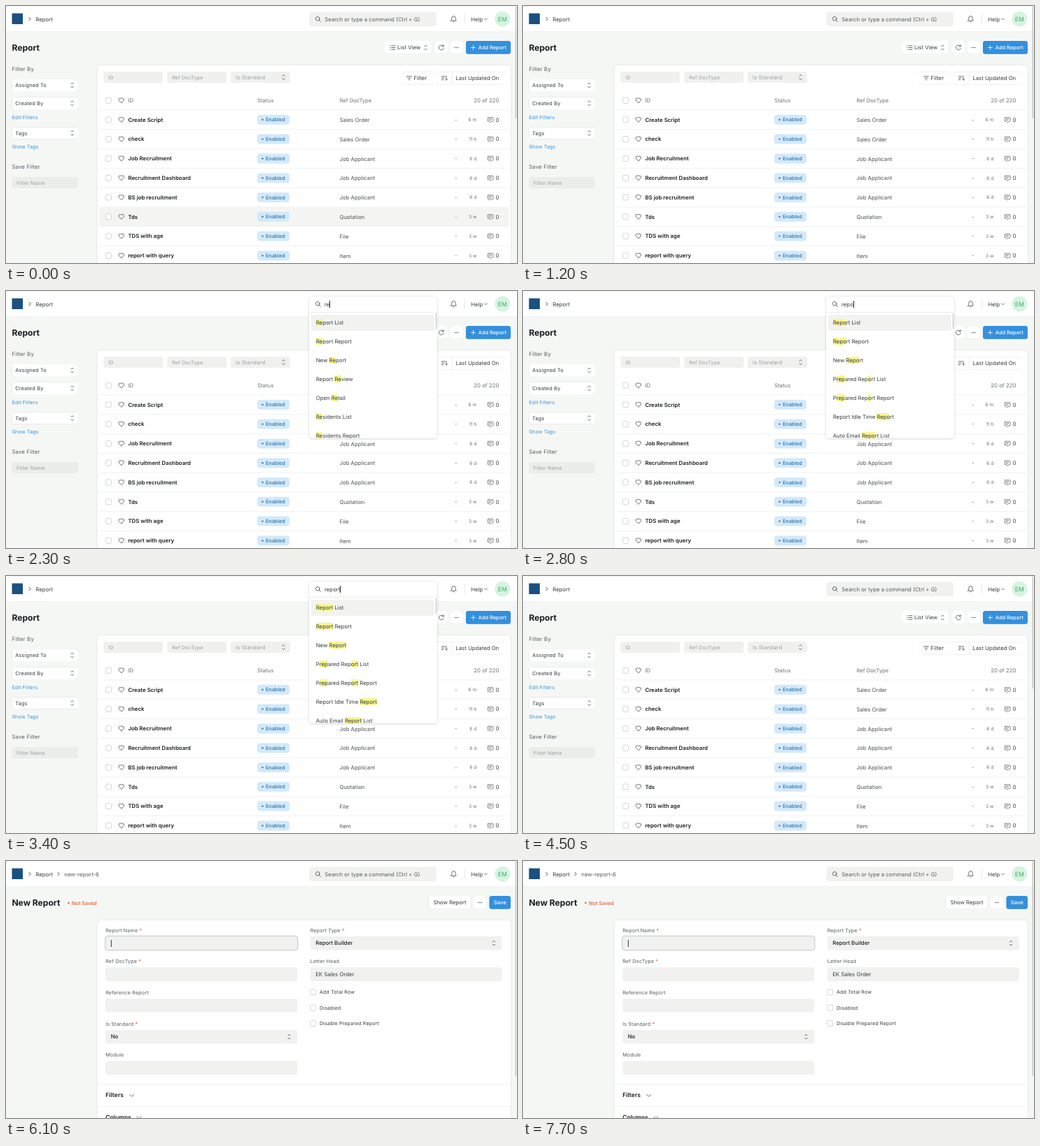
Animation of 730x368 px, one loop 8 s. Source, as an HTML page:

```html
<!DOCTYPE html>
<html lang="en">
<head>
<meta charset="utf-8">
<title>Report list</title>
<style>
html, body { margin: 0; width: 100%; height: 100%; overflow: hidden; background: #f5f7f5; }
body { position: relative; font: 7.8px Inter, sans-serif; color: #383c40; text-rendering: geometricPrecision; }
svg { position: absolute; left: 0; top: 0; display: block; }
text { font-family: Inter, sans-serif; white-space: pre; }
.card { filter: drop-shadow(0 .5px 1px rgba(0, 0, 0, .13)); }
.btn { filter: drop-shadow(0 .4px .6px rgba(0, 0, 0, .28)); }
.line { fill: none; stroke: #444a4f; stroke-width: .8; stroke-linecap: round; stroke-linejoin: round; }
#panel { position: absolute; left: 433px; top: 8px; width: 182.5px; height: 203px; overflow: hidden;
  background: #fff; border-radius: 4px; box-shadow: 0 .5px 3px rgba(0, 0, 0, .22); }
#typed { position: absolute; left: 22px; top: 5.5px; line-height: 10px; height: 10px; border-right: .8px solid #222; }
#hint { position: absolute; left: 22.5px; top: 5.5px; line-height: 10px; color: #777; }
#panel svg { left: 8px; top: 6px; }
#items { position: absolute; left: 0; top: 21.5px; width: 100%; height: 180px; border-top: .6px solid #eaeceb; }
#items div { position: absolute; left: 3px; width: 176px; height: 23px; line-height: 23px; padding-left: 6.7px;
  box-sizing: border-box; border-radius: 3px; white-space: pre; }
#items div:first-child { background: #f2f3f1; }
#items i { position: absolute; right: .5px; top: 1px; width: 1px; height: 22px; background: #b9bcba; }
mark { background: #f8f68f; color: inherit; }
</style>
</head>
<body>
<svg id="stage" width="730" height="368" viewBox="0 0 730 368"></svg>
<div id="panel">
  <svg width="10" height="10"><g class="line"><circle cx="4.2" cy="4.2" r="2.8"/><path d="M6.3 6.3L8.4 8.4"/></g></svg>
  <span id="hint">Search or type a command (Ctrl + G)</span>
  <span id="typed"></span>
  <div id="items"></div>
</div>
<script>
const $ = id => document.getElementById(id);
const INK = '#383c40', DARK = '#1a1e22', GREY = '#6b7177', PALE = '#9a9fa3', BLUE = '#3490dd', FIELD = '#f1f2f0';

// y is the vertical middle of the text
const text = (x, y, s, { size = 7.8, fill = INK, weight = 400, anchor = 'start', gap = 0 } = {}) =>
  `<text x="${x}" y="${y + size * .36}" font-size="${size}" fill="${fill}" font-weight="${weight}" text-anchor="${anchor}" letter-spacing="${gap}">${s}</text>`;
const small = (x, y, s, o) => text(x, y, s, { size: 7.2, gap: .144, ...o });
const rect = (x, y, w, h, r, fill, more = '') =>
  `<rect x="${x}" y="${y}" width="${w}" height="${h}" rx="${r}" fill="${fill}" ${more}/>`;
const line = (d, more = '') => `<path class="line" d="${d}" ${more}/>`;
const rule = (x1, x2, y) => line(`M${x1} ${y}H${x2}`, 'style="stroke:#e9ecea;stroke-width:.7"');
const button = (x, y, w, h, fill = '#fff', id = '') => rect(x, y, w, h, 3.5, fill, `class="btn" ${id}`);
const updown = (x, y) => line(`M${x - 1.7} ${y - 1.7}l1.7-1.8 1.7 1.8M${x - 1.7} ${y + 1.7}l1.7 1.8 1.7-1.8`);
const down = (x, y, r = 1.8) => line(`M${x - r} ${y - r / 2}l${r} ${r} ${r}-${r}`);
const right = (x, y) => line(`M${x - 1} ${y - 2.2}l2.2 2.2-2.2 2.2`, 'style="stroke-width:1"');
const check = (x, y) => rect(x - 4, y - 4, 8, 8, 2, '#fff', 'stroke="#bfc4c6" stroke-width=".7"');
const heart = (x, y) => line(`M${x} ${y + 3.4}l-3.3-3.3a2.1 2.1 0 0 1 3.3-2.7a2.1 2.1 0 0 1 3.3 2.7z`);
const dots = (x, y) => [-2.2, 0, 2.2].map(d => `<circle cx="${x + d}" cy="${y}" r=".65" fill="${INK}"/>`).join('');
const card = () => rect(130.5, 85, 590.5, 300, 5, '#fff', 'class="card"');

function header() {
  return rect(0, 0, 730, 36.6, 0, '#fff') + rule(0, 730, 36.8) + rule(0, 730, .3) +
    rect(8.5, 10.5, 15.5, 15.5, 0, '#1b507f') +
    right(34, 18.5) + text(42.3, 18.7, 'Report') +
    rect(433.5, 8.5, 181.5, 20.5, 4, FIELD) +
    `<g class="line"><circle cx="445.2" cy="18.2" r="2.8"/><path d="M447.3 20.3l2.1 2.1"/></g>` +
    text(455.3, 18.7, 'Search or type a command (Ctrl + G)', { fill: '#555b60' }) +
    line('M635.6 21h7.8c-1-1-1.3-2-1.3-4a2.6 2.6 0 0 0-5.2 0c0 2-.3 3-1.3 4zM638.6 22.6q.9.9 1.8 0') +
    line('M655.3 11.5v14', 'style="stroke:#dcdfdd;stroke-width:.7"') +
    text(664.3, 18.7, 'Help') + down(685.6, 18.8) +
    `<circle cx="709.3" cy="18.5" r="11" fill="#d5f4df"/>` +
    text(709.3, 18.7, 'EM', { size: 8.6, fill: '#46ab6c', anchor: 'middle' });
}

function sidebar() {
  const select = (y, s) => button(8.5, y - 8.6, 94.5, 17.2) + small(13.2, y, s, { size: 7.4 }) + updown(94.6, y);
  const link = (y, s) => small(8.4, y, s, { fill: '#2f93e0', size: 7.1 });
  const title = (y, s) => text(8.4, y, s, { gap: .156, fill: '#565c61' });
  return title(90.5, 'Filter By') + select(113.5, 'Assigned To') + select(139.3, 'Created By') +
    link(159, 'Edit Filters') + select(182, 'Tags') + link(201.5, 'Show Tags') + title(230.5, 'Save Filter') +
    rect(8.5, 244.8, 94.5, 16.2, 3.5, '#ebedeb') + small(15, 253, 'Filter Name', { fill: PALE });
}

const rows = [
  ['Create Script', 'Sales Order', '6 m'], ['check', 'Sales Order', '11 h'],
  ['Job Recruitment', 'Job Applicant', '6 d'], ['Recruitment Dashboard', 'Job Applicant', '6 d'],
  ['BS job recruitment', 'Job Applicant', '6 d'], ['Tds', 'Quotation', '3 w'],
  ['TDS with age', 'File', '3 w'], ['report with query', 'Item', '3 w']
];

function row([name, type, age], i) {
  const y = 162.8 + i * 27.8;
  return (i === 5 ? rect(133, y - 13.5, 585.5, 27, 0, '#f4f5f3', 'id="hover"') : '') +
    check(146.5, y) + heart(164.8, y) + text(174.4, y, name, { size: 7.85, weight: 600, fill: DARK }) +
    rect(359, y - 7, 46, 14, 4, '#d3e9f9') + `<circle cx="366.5" cy="${y}" r="1.2" fill="#2b78b8"/>` +
    text(371, y, 'Enabled', { size: 7.2, weight: 500, fill: '#2873b2' }) +
    text(476.5, y + .4, type, { fill: '#4b5156' }) + text(641, y, '-', { fill: GREY }) +
    text(672.3, y, age, { size: 6.6, fill: GREY, anchor: 'end' }) +
    line(`M689 ${y - 3.2}h6.2q.8 0 .8.8v4.2q0 .8-.8.8h-1.8l-1.4 1.5-1.4-1.5h-1.6q-.8 0-.8-.8v-4.2q0-.8.8-.8M690 ${y - 1.2}h4M690 ${y + .7}h2.6`, 'style="stroke-width:.65"') +
    text(704.5, y, '0', { anchor: 'end' }) + rule(133, 718.5, y + 13.9);
}

function listPage() {
  const filter = (x, s, size = 7.2) => rect(x, 94, 85, 16, 3, '#f0f1ef') + text(x + 7, 102, s, { size, fill: PALE, gap: .1 });
  return text(8.4, 59.2, 'Report', { size: 12.1, weight: 700, fill: DARK }) +
    button(541, 50, 67.5, 18.8) + line('M550.5 56.8h5.5M550.5 59.5h5.5M550.5 62.2h5.5M548.4 56.8h.1M548.4 59.5h.1M548.4 62.2h.1') +
    text(559, 59.5, 'List View') + updown(599.5, 59.5) +
    button(613, 50, 18, 18.8) + line('M624.8 57.6a3.4 3.4 0 1 0 .5 2.6M625.2 55.6v2.3h-2.3') +
    button(635, 50, 18, 18.8) + dots(643.7, 59.5) +
    rect(656, 49, 66, 20.8, 4.4, '#b5d9f4', 'id="ring"') + button(657, 50, 64, 18.8, BLUE, 'id="add"') +
    line('M664.5 59.5h6M667.5 56.5v6', 'style="stroke:#fff"') +
    text(674.8, 59.5, 'Add Report', { size: 7.4, fill: '#fff', weight: 500 }) +
    sidebar() + card() +
    filter(139.3, 'ID') + filter(230.2, 'Ref DocType') + filter(321, 'Is Standard', 7.7) + updown(396.5, 102) +
    button(566, 94.3, 44, 18) + line('M572.5 100.8h7M573.8 103.2h4.4M575.2 105.6h1.6') + text(582.3, 103.3, 'Filter', { size: 8 }) +
    button(615, 94.3, 97, 18) + line('M622.3 100.8h5.5M622.3 103.2h3.8M622.3 105.6h2.2M629.2 100.6v5.4M627.8 104.7l1.4 1.4 1.4-1.4') +
    line('M637.3 94.8v17', 'style="stroke:#e3e6e4;stroke-width:.7"') + text(642.3, 103.3, 'Last Updated On') +
    check(146.5, 135.3) + heart(164.8, 135.3) + text(174.4, 135.3, 'ID', { fill: GREY }) +
    text(359, 135.3, 'Status', { fill: GREY }) + text(476.5, 135.3, 'Ref DocType', { size: 7.6, fill: GREY }) +
    text(704.4, 135.3, '20 of 220', { anchor: 'end', fill: GREY }) + rule(133, 718.5, 148.9) +
    rows.map(row).join('');
}

function formPage() {
  const field = (x, y, label, value = '', { star, pick, bold } = {}) =>
    small(x, y, label + (star ? ' <tspan fill="#e2553f">*</tspan>' : ''), { fill: '#555b60' }) +
    rect(x, y + 8.7, 274, 19.8, 3.5, FIELD) +
    text(x + 7.5, y + 18.6, value, { weight: bold ? 500 : 400, fill: bold ? DARK : INK }) +
    (pick ? updown(x + 262.3, y + 18.6) : '');
  const tick = (y, s) => check(438.6, y) + small(448, y, s, { size: 7.1 });
  const section = (y, s, x) => rule(130.5, 721, y - 15.3) + text(142.2, y, s, { size: 8.6, weight: 600, fill: DARK }) + down(x, y + .6, 3);
  return right(75, 18.5) + text(83.3, 18.7, 'new-report-6', { fill: '#555b60' }) +
    text(8.4, 59.2, 'New Report', { size: 12.1, weight: 700, fill: DARK }) +
    `<circle cx="89.4" cy="60" r="1.2" fill="#e0592f"/>` + small(94, 60, 'Not Saved', { fill: '#e0592f', weight: 500, gap: .05 }) +
    button(603.5, 50, 61, 18.8) + text(634, 59.5, 'Show Report', { anchor: 'middle' }) +
    button(668, 50, 18, 18.8) + dots(677, 59.5) +
    button(690.5, 50, 30.5, 18.8, BLUE) + text(705.7, 59.5, 'Save', { fill: '#fff', anchor: 'middle', weight: 500, size: 7.7 }) +
    card() +
    field(142.2, 99, 'Report Name', '', { star: 1 }) +
    rect(141.7, 107.3, 275, 20.6, 4, FIELD, 'stroke="#cdd1d2" stroke-width="1.3"') +
    rect(149.9, 113, .9, 10, 0, '#222', 'id="caret"') +
    field(142.2, 143.6, 'Ref DocType', '', { star: 1 }) +
    field(142.2, 188.2, 'Reference Report') +
    field(142.2, 233, 'Is Standard', 'No', { star: 1, pick: 1, bold: 1 }) +
    field(142.2, 277.5, 'Module') +
    field(434.7, 99, 'Report Type', 'Report Builder', { star: 1, pick: 1, bold: 1 }) +
    field(434.7, 143.6, 'Letter Head', 'EK Sales Order') +
    tick(187.8, 'Add Total Row') + tick(210.2, 'Disabled') + tick(232.5, 'Disable Prepared Report') +
    section(335.2, 'Filters', 179.6) + section(366.8, 'Columns', 190);
}

$('stage').innerHTML = header() + `<g id="list">${listPage()}</g><g id="form">${formPage()}</g>` +
  rect(727.6, 1, 1.5, 160, .7, '#c3c6c4', 'id="bar"');

// "|" marks where the match begins
const early = ['|Report List', '|Report Report', 'New |Report', 'Report |Review', 'Open |Retail', '|Residents List', '|Residents Report'];
const late = ['|Report List', '|Report Report', 'New |Report', 'P|repared Rep|ort List', 'P|repared Rep|ort Report', 'Report Idle Time |Report', 'Auto Email |Report List'];

function suggest(typed) {
  const list = typed.length < 3 ? early : late;
  $('items').innerHTML = !typed ? '' : list.map((s, i) => {
    const parts = s.split('|');
    let left = typed.length;
    const html = parts[0] + parts.slice(1).map((p, k) => {
      const n = Math.min(left, parts.length > 2 && k === 0 ? 3 : left);
      left -= n;
      return (n ? `<mark>${p.slice(0, n)}</mark>` : '') + p.slice(n);
    }).join('');
    return `<div style="top:${3.6 + i * 27}px">${html}</div>`;
  }).join('') + '<i></i>';
}

const keys = [2100, 2300, 2500, 2700, 2900, 3000];
const show = (id, on) => { $(id).style.display = on ? '' : 'none'; };
let last = null;

function draw(now) {
  const t = now % 8000;
  const open = t >= 1900 && t < 3800;
  const made = t >= 6000;
  const pressed = t >= 5800;
  const typed = 'report'.slice(0, keys.filter(k => t >= k).length);
  show('list', !made);
  show('form', made);
  show('hover', t < 300);
  show('ring', pressed);
  $('add').setAttribute('fill', pressed ? '#1776ca' : BLUE);
  show('caret', t < 7200 || t >= 7700);
  show('bar', !open);
  $('bar').setAttribute('height', made ? 307 : 160);
  show('panel', open);
  if (open && typed !== last) {
    last = typed;
    $('panel').style.height = typed ? '203px' : '21px';
    $('typed').textContent = typed;
    show('hint', !typed);
    suggest(typed);
  }
}

const start = performance.now();
function tick() {
  draw(performance.now() - start);
  requestAnimationFrame(tick);
}
tick();
</script>
</body>
</html>
```
